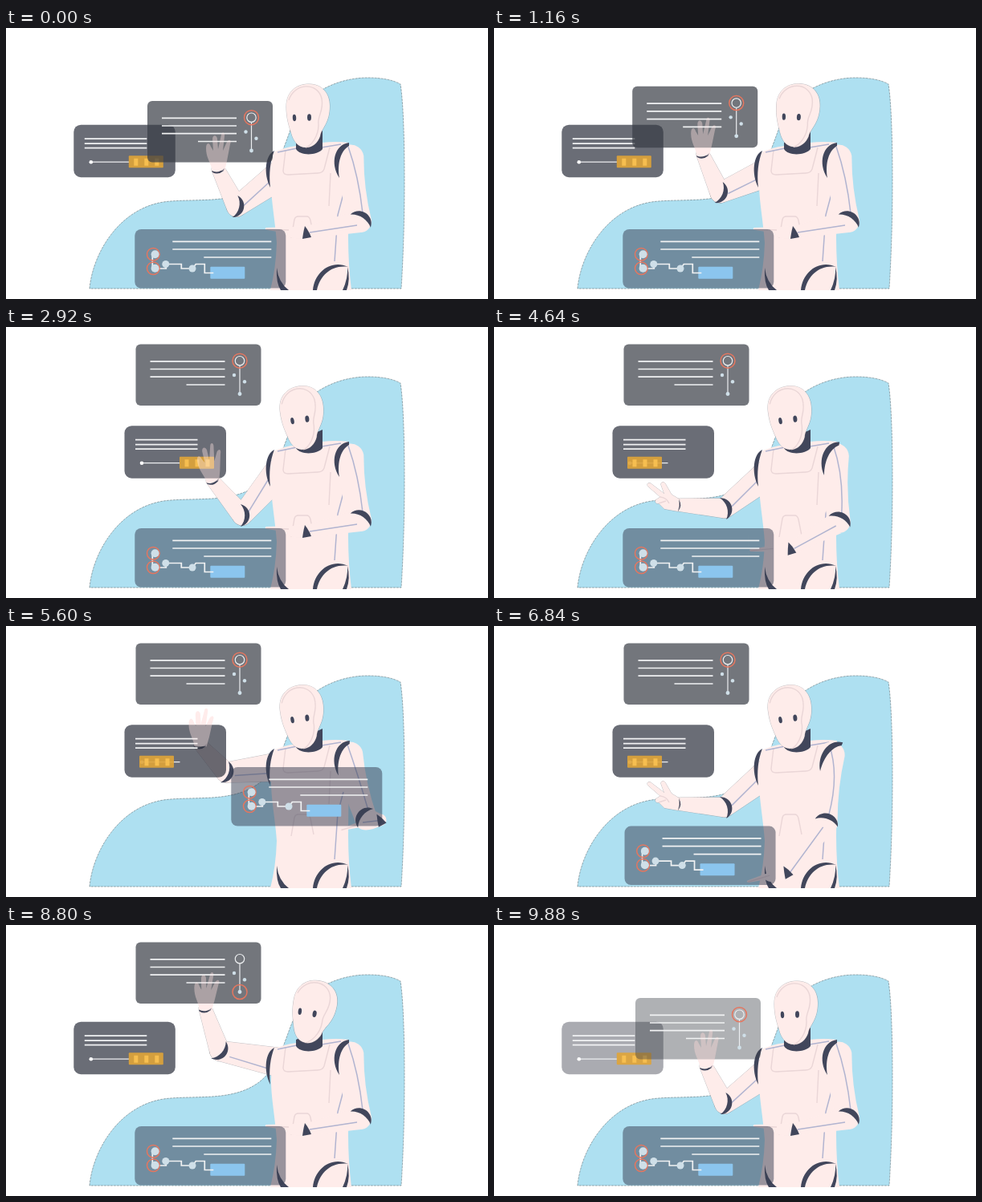
Recreate the animation shown at these times as an HTML page. Size 600 px wide and 338 px high, loop 9920 ms.

```html
<!DOCTYPE html>
<html lang="en">
<head>
<meta charset="utf-8">
<title>Robot with floating panels</title>
<style>
  html, body { margin: 0; width: 100%; height: 100%; overflow: hidden; background: #fff; }
  svg { display: block; width: 100%; height: 100%; }
  .skin { fill: #feecea; }
  .edge { stroke: #77727a; stroke-width: .7; stroke-opacity: .65; paint-order: stroke; }
  .dark { fill: #41465b; }
  .seam { fill: none; stroke: #ead6d7; stroke-width: 1.4; }
  .blue { fill: none; stroke: #b1b4d0; stroke-width: 1.5; }
  .text { fill: none; stroke: #f1f2f3; stroke-width: 1.7; }
  .thin { fill: none; stroke: #eceef0; stroke-width: 1.2; }
  .ring { fill: none; stroke: #e4765f; stroke-width: 1.5; }
  .node { fill: #cfdfe8; }
</style>
</head>
<body>
<svg viewBox="0 0 600 338" xmlns="http://www.w3.org/2000/svg">
  <path fill="#aee0f1" stroke="#66777e" stroke-width=".6" stroke-dasharray="3 1" d="M104 325C108 280 143 220 205 216C243 213 284 219 315 196C346 172 348 130 366 102C384 75 420 62 450 62Q477 62 491 70C495 96 496 150 496 190Q496 260 492 325Z"/>

  <g id="leftArm">
    <path id="leftLimb" class="skin edge"/>
    <path id="leftLine" class="blue"/>
    <path id="leftElbow" class="dark" d="M-2 -14C13 -10 13 10 -2 14C5 6 5 -6 -2 -14Z"/>
    <g id="leftHand">
      <path id="openHand" class="skin" d="M-7 2C-9 -8 -15 -14 -15 -26C-15 -33 -11 -34 -9 -28L-6 -23L-7 -37C-7 -43 -2 -43 -1 -38L0 -25L4 -43C5 -47 9 -46 8 -41L6 -23L11 -34C14 -38 17 -36 15 -31L11 -10L8 2Z"/>
      <g id="pointHand">
        <path class="skin edge" d="M0 -7L-10 -13L-18 -27C-20 -30 -24 -28 -23 -25L-19 -14L-36 -27C-40 -29 -41 -25 -39 -23L-24 -10L-30 -6C-31 -3 -28 -1 -26 -2L-19 5L-2 8Z"/>
        <path class="seam" d="M-24 -10Q-16 -9 -13 -2M-26 -2L-17 -5"/>
        <path class="dark" d="M-1 -7Q4 1 -2 8Q1 1 -1 -7Z"/>
      </g>
      <path id="leftCuff" class="dark" d="M-8 2Q0 6 8 -1L7 2Q0 8 -7 4Z"/>
    </g>
  </g>

  <path class="skin" d="M331 156Q345 149 362 147L393 143Q411 141 427 143L426 262Q426 295 430 327H329Q336 300 337 268C335 240 330 215 330 195Z"/>
  <path class="dark" d="M334 153C323 158 320 181 329 199C327 181 329 166 334 153Z"/>
  <path class="dark" d="M337 299Q339 317 352 327H342Q336 318 337 299Z"/>
  <path class="dark" d="M382 327C384 304 405 288 426 298C406 295 391 308 387 327Z"/>
  <path class="dark" d="M425 298Q426 312 419 327H424Q429 313 425 298Z"/>
  <path class="seam" d="M348 152L345 178Q345 183 351 183L388 181Q394 181 396 176L403 149M355 262L359 239Q360 235 364 235H374Q378 235 379 240L383 260M404 181L402 222"/>
  <path class="blue" d="M338 155L362 150M393 149L417 145M409 291L413 233L420 207"/>

  <path class="dark" d="M361 143V151C366 160 388 159 394 151V128Z"/>
  <g id="head">
    <path class="skin edge" d="M349 98C349 79 362 70 377 70C394 70 403 82 403 97C403 119 393 124 391 135C388 144 380 150 373 149C364 149 358 142 355 131C352 121 349 112 349 98Z"/>
    <path class="seam" d="M352 90C359 68 388 67 393 88C396 105 387 109 389 121C389 135 380 147 373 149"/>
    <g id="eyes">
      <ellipse class="dark" cx="359" cy="112" rx="2.2" ry="4.2" transform="rotate(-4 359 112)"/>
      <ellipse class="dark" cx="377.5" cy="111.5" rx="2.5" ry="4.2"/>
    </g>
  </g>

  <g id="rightHand">
    <path class="skin" d="M0 -8L-14 -7L-49 -6C-52 -6 -52 -4 -49 -3L-29 0C-25 6 -16 9 0 7Z"/>
    <path class="seam" d="M-50 -4L-22 -3"/>
  </g>
  <path id="rightLimb" class="skin"/>
  <path id="rightLine" class="blue"/>
  <path id="rightCuff" class="dark" d="M-1 -8Q4 -2 7 6L-4 8Q-3 0 -1 -8Z"/>
  <path id="rightElbow" class="dark" d="M0 -15C16 -11 16 11 1 15C7 6 7 -6 0 -15Z"/>
  <path id="shoulder" class="dark" d="M2 -19C-16 -17 -22 7 -10 25C-13 6 -8 -9 2 -15Z"/>

  <g id="panel2">
    <rect class="back" width="126.5" height="65.5" rx="9" fill="#2c2f3c"/>
    <path class="text" d="M13.5 17.5H91M13.5 23.5H91M13.5 29H91"/>
    <path class="thin" d="M21.5 46.5H69"/>
    <circle cx="21.5" cy="46.5" r="2.3" fill="#fff"/>
    <g id="block">
      <rect x="68.5" y="38.5" width="43" height="15" rx="1" fill="#e0a538" opacity=".9"/>
      <path fill="#f6be50" d="M75 42h5v9h-5zM88 42h5v9h-5zM101 42h5v9h-5z"/>
    </g>
  </g>

  <g id="panel1">
    <rect class="back" width="156" height="76.5" rx="6" fill="#383c45"/>
    <path class="text" d="M18 21.3H111M18 31H111M18 40.7H111M63 50.5H111"/>
    <path class="thin" d="M129.5 26.5V62"/>
    <circle class="thin" cx="129.5" cy="20.7" r="5.7"/>
    <g class="node">
      <circle cx="122.5" cy="38.5" r="2.2"/>
      <circle cx="135.5" cy="46.7" r="2.2"/>
      <circle cx="129.5" cy="62" r="2.4"/>
    </g>
    <circle id="slider" class="ring" cx="129.5" cy="20.7" r="9"/>
  </g>

  <use id="handGlow" href="#openHand" opacity=".4"/>

  <g id="panel3">
    <rect width="188" height="73.5" rx="8" fill="#363c50" opacity=".5"/>
    <path class="text" d="M47 15.3H170M47 25H170M86 35H170"/>
    <rect x="94" y="46.7" width="43" height="15" rx="1" fill="#8bc5ee"/>
    <path class="text" d="M22 31.5V49H39V43.5H58V49H72L76 43.5H87V54.5H98"/>
    <circle class="ring" cx="23" cy="31.2" r="7.8"/>
    <circle class="ring" cx="23" cy="48.7" r="7.8"/>
    <g class="node">
      <circle cx="25.3" cy="31.2" r="5"/>
      <circle cx="25.3" cy="48.7" r="5"/>
      <circle cx="38.5" cy="43.5" r="4.5"/>
      <circle cx="71.7" cy="49" r="4.5"/>
    </g>
  </g>
</svg>
<script>
const LOOP = 9920;
const parts = {};
document.querySelectorAll('[id]').forEach(el => parts[el.id] = el);
const backs = document.querySelectorAll('.back');

const set = (id, name, value) => parts[id].setAttribute(name, value);
const place = (id, x, y, angle = 0) => set(id, 'transform', `translate(${x} ${y}) rotate(${angle})`);
const show = (id, on) => parts[id].style.display = on ? '' : 'none';

function ease(t, from, to) {
  const u = Math.min(1, Math.max(0, (t - from) / (to - from)));
  return u * u * (3 - 2 * u);
}

// Rises to 1 between a and b, falls back to 0 between c and d
const hold = (t, a, b, c, d) => ease(t, a, b) - ease(t, c, d);

function mix(a, b, u) {
  const result = {};
  for (const key in a) result[key] = a[key] + (b[key] - a[key]) * u;
  return result;
}

// s: shoulder, e: elbow, w: wrist
const pose = (sx, sy, ex, ey, wx, wy, turn, point = 0) => ({ sx, sy, ex, ey, wx, wy, turn, point });
const rest = pose(340, 184, 287, 223, 264, 176, 0);
const raised = pose(338, 171, 266, 157, 248, 104, 3);
const pointing = pose(340, 184, 287, 226, 231, 222, 0, 1);
const gripping = slide => pose(338, 183, 294 + slide * .25, 235, 257 + slide, 191, -9);
const folded = pose(429, 162, 441, 241, 374, 255, 0);
const lowered = pose(420, 161, 413, 246, 363, 308, -19);

function leftPose(t, slide) {
  const grip = gripping(slide);
  const steps = [
    [960, 1560, raised], [2280, 2560, grip], [3600, 4120, pointing], [5320, 5800, raised],
    [6400, 6800, pointing], [7440, 7640, grip], [8440, 8800, raised], [8920, 9400, rest]
  ];
  return steps.reduce((now, [from, to, next]) => mix(now, next, ease(t, from, to)), rest);
}

function rightPose(t, pull) {
  const arm = mix(folded, lowered, hold(t, 4480, 4850, 6880, 7360));
  return { ...arm, sx: arm.sx + 8 * pull, ex: arm.ex + 35 * pull, ey: arm.ey - 6 * pull,
    wx: arm.wx + 103 * pull, wy: arm.wy - 66 * pull };
}

// Two circles joined by sides that bow along the normal
function limb(x1, y1, r1, x2, y2, r2, bow = 0) {
  const d = Math.hypot(x2 - x1, y2 - y1);
  const nx = (y2 - y1) / d, ny = (x1 - x2) / d;
  const at = (x, y, r) => `${x + nx * r} ${y + ny * r}`;
  const mx = (x1 + x2) / 2, my = (y1 + y2) / 2, mid = (r1 + r2) / 2;
  return `M${at(x1, y1, r1)}Q${at(mx, my, bow + mid)} ${at(x2, y2, r2)}` +
    `A${r2} ${r2} 0 0 1 ${at(x2, y2, -r2)}` +
    `Q${at(mx, my, bow - mid)} ${at(x1, y1, -r1)}A${r1} ${r1} 0 0 1 ${at(x1, y1, r1)}Z`;
}

function drawArm(side, arm, shoulderR, elbowR, wristR, bow) {
  const { sx, sy, ex, ey, wx, wy, turn } = arm;
  set(side + 'Limb', 'd', limb(sx, sy, shoulderR, ex, ey, elbowR, bow) + limb(ex, ey, elbowR, wx, wy, wristR));
  const upper = Math.hypot(sx - ex, sy - ey), lower = Math.hypot(wx - ex, wy - ey);
  const bx = (sx - ex) / upper - (wx - ex) / lower, by = (sy - ey) / upper - (wy - ey) / lower;
  place(side + 'Elbow', ex, ey, Math.atan2(by, bx) * 180 / Math.PI);
  place(side + 'Hand', wx, wy, turn);
}

function draw(t) {
  const lift = hold(t, 960, 1560, 8920, 9400);
  const drag = hold(t, 2560, 2920, 8000, 8640);
  const push = hold(t, 3240, 3700, 7640, 7900);
  const pull = hold(t, 4840, 5160, 6400, 6880);
  const lookUp = hold(t, 960, 1560, 2280, 2800) + hold(t, 8440, 8860, 8920, 9400);
  const lookDown = hold(t, 2280, 2800, 8440, 8860);
  const ringDown = hold(t, 1480, 1840, 2280, 2560) + hold(t, 5760, 6200, 6400, 6720) +
    hold(t, 8520, 8780, 8920, 9400);

  place('panel1', 176 - 14.5 * lift, 91 - 69.5 * lift);
  place('slider', 0, 41.3 * ringDown);
  place('panel2', 84.3 + 63.2 * drag, 120.7 + 2.5 * drag);
  place('block', -50 * push, 0);
  place('panel3', 160.3 + 120 * pull, 251 - 75 * pull);

  const left = leftPose(t, 63 * (drag - 1) - 50 * push);
  const right = rightPose(t, pull);
  drawArm('left', left, 18, 12.5, 8);
  drawArm('right', right, 16.5, 14, 7.5, -5);

  const { sx, sy, ex, ey } = left;
  set('leftLine', 'd', `M${sx - 12} ${sy + 8}L${ex + (sx - ex) * .17} ${ey + (sy - ey) * .17 + 5}`);
  const isPointing = left.point > .5;
  show('pointHand', isPointing);
  for (const id of ['openHand', 'leftCuff', 'handGlow']) show(id, !isPointing);
  place('handGlow', left.wx, left.wy, left.turn);

  set('rightLine', 'd', `M${right.sx - 3} 148Q${right.sx + 10} 185 ${right.ex + 3} ${right.ey - 10}` +
    `M${right.ex - 4} ${right.ey + 5}L${right.wx + 4} ${right.wy}`);
  place('rightCuff', right.wx - 1, right.wy, right.turn);
  place('shoulder', 425, 162, (429 - right.sx) * 2.6);

  set('head', 'transform', `translate(${-3 * lookDown} ${3.5 * lookDown - 2 * lookUp}) ` +
    `rotate(${12 * lookUp - 6 * lookDown} 376 146)`);
  place('eyes', 4 * lookDown, 0);

  backs.forEach(el => el.setAttribute('opacity', .7 - .3 * ease(t, 9440, 9880)));
}

const start = performance.now();
function tick(now) {
  draw(Math.max(0, now - start) % LOOP);
  requestAnimationFrame(tick);
}
draw(0);
requestAnimationFrame(tick);
</script>
</body>
</html>
```
